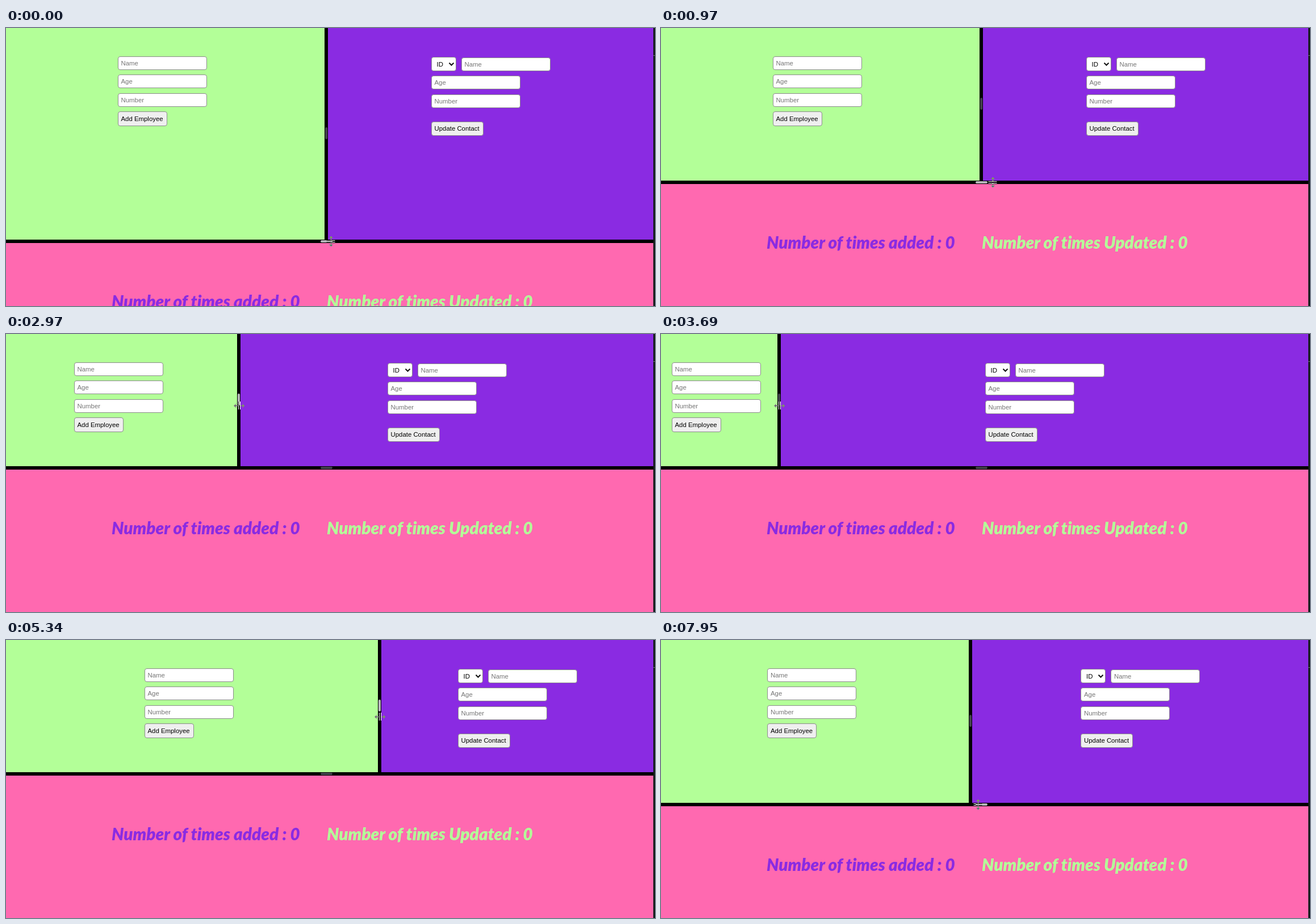
An HTML page for the animation above (8 s loop, 1143x490 px).

```html
<!DOCTYPE html>
<html lang="en">
<head>
<meta charset="utf-8">
<title>Split panes</title>
<style>
html, body { margin: 0; width: 100%; height: 100%; overflow: hidden; background: #000; }
body { position: relative; font: 11.4px "Liberation Sans", Arial, sans-serif; }
body div, body svg { position: absolute; box-sizing: border-box; }
#left, #right { top: 0; overflow: hidden; }
#left { left: 0; background: #b3ff98; }
#right { background: #8a2be2; --wrap: 0; }
#bottom { left: 0; width: 1140px; height: 490px; background: #ff69b0; }
#edge { left: 1140px; top: 0; width: 3px; height: 490px; background: #141c1c; }
#edge div { top: 48px; width: 3px; height: 1px; background: #66756c; }
.grip { border-radius: 2px; background: #42424c; }
.grip.hot { background: #b6b6ba; }
.field, .button, .select {
  display: flex; align-items: center; white-space: pre;
  border: 1px solid #8c8c8c; border-radius: 4px; padding: 0 5px;
}
.field { width: 157px; height: 24px; background: #fff; color: #757575; }
#left .field { top: calc(50px + 32.35px * var(--n)); }
#right .field { top: calc(52.1px + 32.35px * (var(--n) + var(--wrap))); }
#name { left: calc(53px * (1 - var(--wrap))); }
.button { height: 25.6px; padding-right: 6px; background: #efefef; color: #000; }
#add { top: 147px; }
#update { top: calc(164.5px + 32.35px * var(--wrap)); }
.select { top: 51px; width: 44px; height: 25px; padding-left: 9px; background: #fff; color: #000; }
.select svg { left: 29px; top: 8px; }
.title {
  top: 83px; line-height: 40px; white-space: pre; font-variant-ligatures: none;
  font-family: Lato, "Open Sans", sans-serif; font-size: 29.7px; font-weight: 900; font-style: italic;
}
#spin { right: 6px; top: 5px; width: 12px; height: 12px; background: #efefef; }
.cursor { overflow: visible; left: 0; top: 0; width: 1px; height: 1px; }
.invert { mix-blend-mode: difference; fill: none; stroke: #fff; }
</style>
</head>
<body>
<div id="left">
  <div id="addForm">
    <div class="field" style="--n:0">Name</div>
    <div class="field" style="--n:1">Age</div>
    <div class="field" style="--n:2">Number</div>
    <div class="button" id="add">Add Employee</div>
  </div>
</div>
<div id="right">
  <div id="editForm">
    <div class="select">ID<svg width="11" height="8" fill="none" stroke="#111" stroke-width="2"><path d="M1.5 1.5 5.5 5.5 9.5 1.5"/></svg></div>
    <div class="field" id="name" style="--n:0">Name</div>
    <div class="field" style="--n:1">Age<div id="spin"><svg width="12" height="12" fill="#444"><path d="M2.5 5 6 1 9.5 5ZM2.5 7 6 11 9.5 7Z"/></svg></div></div>
    <div class="field" style="--n:2">Number</div>
    <div class="button" id="update">Update Contact</div>
  </div>
</div>
<div id="bottom">
  <div class="title" style="left:186px;color:#8a2be2">Number of times added : 0</div>
  <div class="title" style="left:565px;color:#b3ff98">Number of times Updated : 0</div>
</div>
<div class="grip" id="gripX" style="width:4px;height:21px"></div>
<div class="grip" id="gripY" style="left:554px;width:21px;height:4px"></div>
<div id="edge"><div></div></div>

<svg class="cursor invert" id="row"><path d="M-7.5-1.5h15M-7.5 1.5h15M.5-2V-8M.5 2V8M-2.5-5.5 .5-8.5 3.5-5.5M-2.5 5.5 .5 8.5 3.5 5.5"/></svg>
<svg class="cursor invert" id="col"><path d="M-.5-7v14M2.5-7v14M-2 .5H-7M3.5 .5H8.5M-5-2.5-8 .5-5 3.5M6.5-2.5 9.5 .5 6.5 3.5"/></svg>
<svg class="cursor invert" id="beam"><path d="M-3-6.5H-.5M.5-6.5H3M-3 6.5H-.5M.5 6.5H3M0-6V6"/></svg>
<svg class="cursor" id="arrow"><path d="M.5 .5V14L3.6 11.1 5.8 16.2 8 15.2 5.8 10.3H10.2Z" fill="#fff" stroke="#111"/></svg>

<script>
const LOOP = 8000, STEP = 122, STAGE = 1140, BAR = 6, MIN_X = 205, MAX_X = 920;
const $ = id => document.getElementById(id);

const hold = () => 0;
const linear = p => p;
const out = p => Math.sin(p * Math.PI / 2);

// Pointer path: time, x, y, cursor, and how it moves on from here.
const path = [
  [0, 572, 376, "row", linear],
  [320, 574, 394, "row", hold],
  [710, 580, 358, "row", linear],
  [970, 584, 272, "row", out],
  [1360, 586, 236, "row", hold],
  [1950, 570, 182, "arrow", linear],
  [2430, 564, 126, "col", hold],
  [2710, 534, 126, "col", out],
  [3690, 208, 126, "col", linear],
  [4330, 988, 136, "beam", hold],
  [4480, 1044, 136, "beam", hold],
  [4740, 902, 136, "col", out],
  [5760, 545, 135, "col", hold],
  [6290, 575, 204, "arrow", hold],
  [6660, 566, 222, "arrow", hold],
  [6780, 561, 236, "row", hold],
  [7170, 561, 250, "row", linear],
  [7530, 561, 304, "row", hold],
  [7950, 558, 290, "row", hold]
].map(([t, x, y, kind, ease]) => ({ t, x, y, kind, ease }));

function pointer(t) {
  const i = path.findLastIndex(k => k.t <= t);
  const a = path[i], b = path[i + 1] || { ...a, t: LOOP };
  const ticked = Math.floor((t - a.t) / STEP) * STEP;
  const p = a.ease(ticked / (b.t - a.t));
  const mix = key => Math.round(a[key] + (b[key] - a[key]) * p);
  return { x: mix("x"), y: mix("y"), kind: a.kind };
}

// Pointer at the latest moment one of these cursors was dragging.
function lastDrag(t, ...kinds) {
  const i = path.findLastIndex(k => k.t <= t && kinds.includes(k.kind));
  if (i < 0) return null;
  const end = i + 1 < path.length ? path[i + 1].t : LOOP;
  return pointer(Math.min(t, end - 1));
}

function box(id, values) {
  for (const key in values) $(id).style[key] = values[key] + "px";
}

function draw(t) {
  const mouse = pointer(t);
  const dragX = lastDrag(t, "col", "beam") || { x: 564 };
  const x = Math.min(MAX_X, Math.max(MIN_X, dragX.x - 3));
  const y = lastDrag(t, "row").y - 3;
  const rightWidth = STAGE - x - BAR;

  box("left", { width: x, height: y });
  box("right", { left: x + BAR, width: rightWidth, height: y });
  box("bottom", { top: y + BAR });
  box("addForm", { left: x / 2 - 84 });
  box("editForm", { left: Math.max(5, rightWidth / 2 - 105) });
  $("right").style.setProperty("--wrap", rightWidth < 218 ? 1 : 0);

  box("gripX", { left: x + 1, top: Math.floor(y / 2) - 11 });
  box("gripY", { top: y + 1 });
  $("gripX").classList.toggle("hot", mouse.kind === "col" && x > MIN_X && x < MAX_X);
  $("gripY").classList.toggle("hot", mouse.kind === "row");
  $("spin").style.display = mouse.kind === "beam" ? "block" : "none";

  for (const id of ["row", "col", "beam", "arrow"]) {
    $(id).style.display = id === mouse.kind ? "block" : "none";
  }
  box(mouse.kind, { left: mouse.x, top: mouse.y });
}

const start = performance.now();
function frame() {
  draw((performance.now() - start) % LOOP);
  requestAnimationFrame(frame);
}
frame();
</script>
</body>
</html>
```
